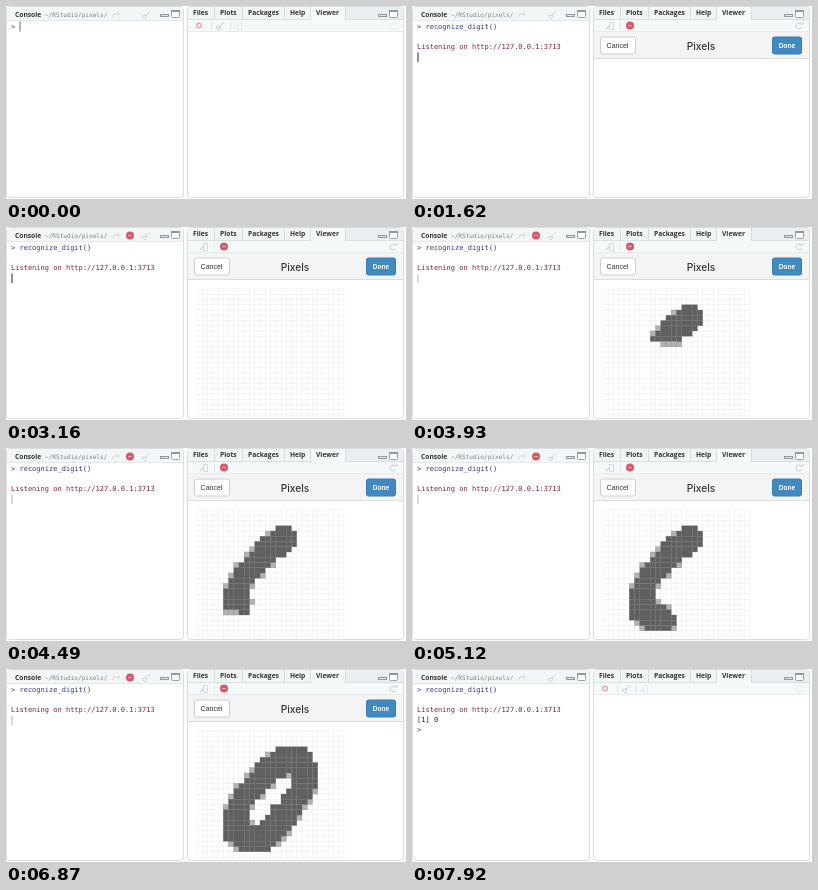
An HTML page with a canvas that plays this animation: 400 by 193 pixels, repeating every 7990 ms.

```html
<!DOCTYPE html>
<html lang="en">
<head>
<meta charset="utf-8">
<title>Pixels</title>
<style>
html, body { margin: 0; width: 100%; height: 100%; overflow: hidden; background: #fff; }
canvas { display: block; width: 400px; height: 193px; }
</style>
</head>
<body>
<canvas id="stage" width="400" height="193"></canvas>
<script>
const ctx = document.getElementById('stage').getContext('2d');

const LOOP = 7990;
const AT = { command: 1060, listening: 1270, toolbar: 1340, header: 1480, grid: 1830, draw: 3505, done: 7150, blinkOff: 7920 };
const UI = '"Open Sans", sans-serif';
const MONO = '"DejaVu Sans Mono", monospace';
const HELV = '"Liberation Sans", Arial, sans-serif';
const GRID = { x: 191, y: 62, cell: 5.25, count: 28 };
const DARK = '#5f5f5f', LIGHT = '#b2b2b2';

// First and last column per row, starting at row 3.
const TOP_ROW = 3;
const downStroke = [
  [15, 17], [14, 18], [12, 18], [11, 18], [11, 17], [10, 16], [9, 14], [8, 13], [7, 12], [7, 11],
  [6, 10], [6, 9], [5, 9], [5, 9], [5, 9], [5, 11], [5, 12], [5, 13], [7, 13], [8, 12]
];
const upStroke = [
  [18, 20], [19, 21], [19, 21], [19, 22], [18, 22], [18, 22], [18, 22], [18, 22], [17, 21], [16, 21],
  [16, 20], [14, 19], [14, 19], [13, 18], [12, 18], [11, 17], [13, 16], [14, 15], [14, 14], [13, 13]
];
// Soft edge cells as [row, column].
const downSoft = [[4, 13], [7, 10], [8, 9], [10, 7], [10, 14], [12, 6], [12, 12], [14, 5], [14, 10], [17, 10], [18, 12], [21, 6], [22, 7], [22, 13]];
const upSoft = [[8, 17], [11, 22], [13, 21], [14, 20], [16, 19], [19, 17], [20, 16], [21, 15]];

function downTime(row, col) {
  if (row > 17 && col > 9) return 4720 + (col - 10) * 100;
  const end = downStroke[row - TOP_ROW][1];
  return AT.draw + (row - TOP_ROW) * 57 + Math.max(0, end - col) * 10;
}

function upTime(row, col) {
  const start = upStroke[row - TOP_ROW][0];
  return 5180 + (22 - row) * 73 + (row < 5 ? 22 - col : Math.max(0, col - start)) * 10;
}

function buildCells() {
  const cells = [];
  const add = (spans, soft, timeOf) => {
    soft.forEach(([row, col]) => cells.push({ row, col, soft: true, at: timeOf(row, col) }));
    spans.forEach(([first, last], i) => {
      for (let col = first; col <= last; col++) {
        const row = i + TOP_ROW;
        cells.push({ row, col, at: timeOf(row, col) });
      }
    });
  };
  add(downStroke, downSoft, downTime);
  add(upStroke, upSoft, upTime);
  return cells;
}
const cells = buildCells();

function rect(x, y, w, h, color) {
  ctx.fillStyle = color;
  ctx.fillRect(x, y, w, h);
}

function box(x, y, w, h, radius, fill, stroke) {
  ctx.beginPath();
  ctx.roundRect(x + 0.5, y + 0.5, w - 1, h - 1, radius);
  if (fill) { ctx.fillStyle = fill; ctx.fill(); }
  if (stroke) { ctx.strokeStyle = stroke; ctx.lineWidth = 1; ctx.stroke(); }
}

function line(points, color, width = 1) {
  ctx.beginPath();
  points.forEach(([x, y]) => ctx.lineTo(x, y));
  ctx.strokeStyle = color;
  ctx.lineWidth = width;
  ctx.stroke();
}

function text(str, x, y, font, color, align = 'left') {
  ctx.font = font;
  ctx.fillStyle = color;
  ctx.textAlign = align;
  ctx.fillText(str, x, y);
}

function disc(x, y, r, color) {
  ctx.beginPath();
  ctx.arc(x, y, r, 0, Math.PI * 2);
  ctx.fillStyle = color;
  ctx.fill();
}

function stopSign(x, y) {
  disc(x, y, 4, '#d4586a');
  rect(x - 2, y - 0.6, 4, 1.2, '#e6a3ac');
}

function broom(x, y, color) {
  line([[x + 4, y - 4], [x - 1, y + 1]], color);
  line([[x - 4, y + 1], [x - 1, y + 4], [x + 1, y + 1], [x - 1, y], [x - 4, y + 1]], color);
}

function arrow(x, y, color) {
  line([[x - 4, y + 2], [x - 2, y - 1], [x + 3, y - 1]], color, 1.4);
  line([[x + 1, y - 3], [x + 4, y - 1], [x + 1, y + 1]], color);
}

function popOut(x, y, color) {
  box(x - 1, y - 4, 5, 8, 0, null, color);
  line([[x - 4, y + 3], [x, y - 1]], color, 1.4);
}

function refresh(x, y, color) {
  ctx.beginPath();
  ctx.arc(x, y, 3, 0.4, 5.5);
  ctx.strokeStyle = color;
  ctx.lineWidth = 1;
  ctx.stroke();
  line([[x + 1, y - 2], [x + 4, y - 2], [x + 4, y - 4]], color);
}

function windowButtons(x, y) {
  rect(x, y + 4, 9, 3, '#8f999f');
  rect(x + 1, y + 5, 7, 1, '#dfe4e6');
  box(x + 11, y, 9, 8, 1, '#fff', '#9aa4a9');
  rect(x + 11, y, 9, 2, '#8f999f');
}

function drawCaret(t) {
  const running = t >= AT.listening && t < AT.done;
  if (running) {
    if (t >= AT.draw) rect(5.5, 47, 1, 9, '#b5b5b5');
    else if ((t - 1140) % 1000 < 500) rect(5.5, 46.5, 1, 9.5, '#222');
  } else if (t >= AT.done) {
    if (t < AT.blinkOff) rect(13.5, 57, 1, 9, '#444');
  } else if (t >= AT.command) {
    rect(87, 16, 1, 9.5, '#444');
  } else if (t < 500 || t >= 990) {
    rect(13.5, 15.5, 1, 10, '#666');
  }
}

function drawConsole(t) {
  box(0, 0, 178, 192, 3, '#fff', '#d8dee1');
  rect(1, 1, 176, 13, '#f3f6f7');
  rect(1, 14, 176, 1, '#e3e8ea');
  text('Console', 9, 10.6, 'bold 6.7px ' + UI, '#333');
  text('~/RStudio/pixels/', 39, 10.6, '6.1px ' + MONO, '#7c8285');
  arrow(110, 9, '#dce2e5');
  broom(140, 9, '#d0d6d9');
  if (t >= AT.grid && t < AT.done) stopSign(124, 8.5);
  windowButtons(154, 4);

  const font = '7.03px ' + MONO;
  const idle = t < AT.command;
  text('>' + (idle ? '' : ' recognize_digit()'), 5, 23, font, idle ? '#444466' : '#34349a');
  if (t >= AT.listening) text('Listening on http://127.0.0.1:3713', 5, 43, font, '#8a1e34');
  if (t >= AT.done) {
    text('[1] 0', 5, 53.3, font, '#222');
    text('>', 5, 63.4, font, '#34349a');
  }
  drawCaret(t);
}

function drawTabs() {
  box(181, 0, 217, 192, 3, '#fff', '#d8dee1');
  rect(182, 1, 215, 13, '#e9eef0');
  rect(182, 1, 123, 12, '#f1f5f6');
  rect(182, 13, 215, 1, '#d9e0e3');
  rect(305, 1, 34, 13, '#f7fafa');
  [208, 236, 278, 304, 339].forEach(x => rect(x, 1, 1, 12, '#d5dde0'));
  [['Files', 187], ['Plots', 214], ['Packages', 242], ['Help', 284], ['Viewer', 310]]
    .forEach(([name, x]) => text(name, x, 8.6, 'bold 6.7px ' + UI, '#333'));
  windowButtons(372, 4);
}

function drawToolbar(active) {
  rect(182, 14, 215, 11, '#f6f9fa');
  rect(182, 25, 215, 1, '#e6ebed');
  if (active) {
    popOut(198, 20, '#d3d9dc');
    rect(208, 16, 1, 8, '#e2e7e9');
    stopSign(218, 19.5);
    refresh(387, 20, '#c5d0d5');
    return;
  }
  ctx.beginPath();
  ctx.arc(193, 19.5, 2.3, 0, Math.PI * 2);
  ctx.strokeStyle = '#e3aaa8';
  ctx.lineWidth = 1.4;
  ctx.stroke();
  rect(205, 16, 1, 8, '#dde3e5');
  broom(214, 20, '#c7cdd0');
  rect(224, 16, 1, 8, '#dde3e5');
  popOut(232, 20, '#e6ebed');
  refresh(387, 20, '#e8edef');
}

function drawHeader() {
  rect(182, 26, 215, 27, '#f4f4f4');
  rect(182, 52, 215, 1, '#dcdcdc');
  box(188, 30.5, 36, 18, 2, '#fff', '#cfcfcf');
  text('Cancel', 205.5, 42, '7px ' + HELV, '#333', 'center');
  text('Pixels', 289, 43.5, '500 10.2px Inter, sans-serif', '#333', 'center');
  box(360, 30.5, 30, 18, 2, '#4189c1', '#3a7db3');
  text('Done', 375, 42, 'bold 6.6px ' + HELV, '#fff', 'center');
}

function drawGrid(t) {
  const { x, y, cell, count } = GRID;
  const size = cell * count;
  ctx.save();
  ctx.beginPath();
  ctx.rect(182, 54, 215, 137);
  ctx.clip();
  for (let i = 0; i <= count; i++) {
    const d = i * cell;
    rect(x + d - 0.3, y, 0.6, size, '#f0edee');
    rect(x, y + d - 0.3, size, 0.6, '#f0edee');
  }
  for (const c of cells) {
    if (t < c.at) continue;
    const left = x + c.col * cell, top = y + c.row * cell;
    rect(left, top, cell, cell, c.soft || t < c.at + 30 ? LIGHT : DARK);
    ctx.strokeStyle = 'rgba(110, 110, 110, 0.5)';
    ctx.lineWidth = 0.5;
    ctx.strokeRect(left, top, cell, cell);
  }
  ctx.restore();
}

function drawViewer(t) {
  const open = t < AT.done;
  drawTabs();
  drawToolbar(open && t >= AT.toolbar);
  if (open && t >= AT.header) drawHeader();
  if (open && t >= AT.grid) drawGrid(t);
}

function render(now) {
  const t = now % LOOP;
  rect(0, 0, 400, 193, '#fbfcfc');
  drawConsole(t);
  drawViewer(t);
}

const start = performance.now();
function tick() {
  render(performance.now() - start);
  requestAnimationFrame(tick);
}
tick();
</script>
</body>
</html>
```
